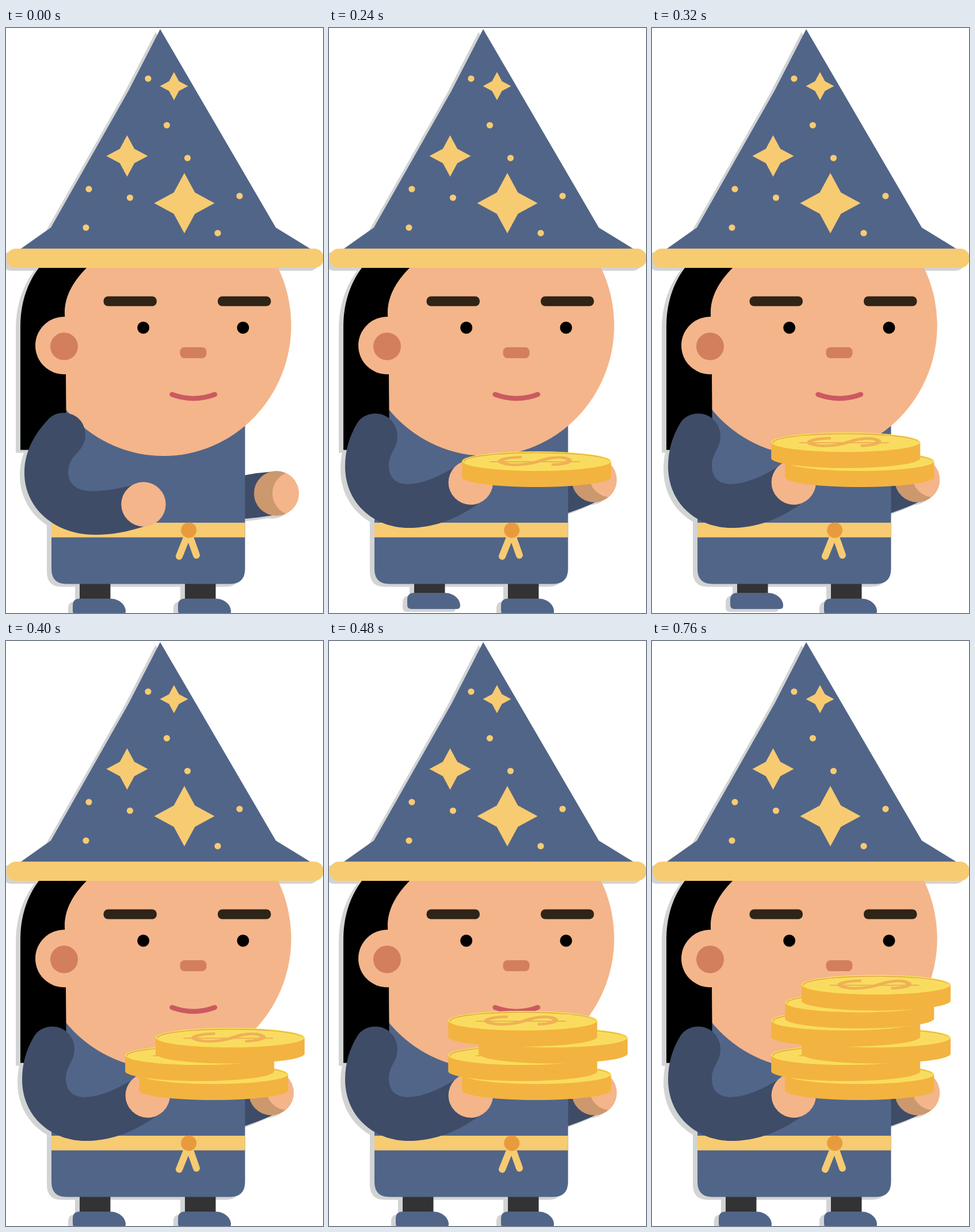
An HTML page for the animation above (0.8 s loop, 551 by 1017 pixels).

```html
<!DOCTYPE html>
<html lang="en">
<head>
<meta charset="utf-8">
<title>Wizard with coins</title>
<style>
  html, body { margin: 0; width: 100%; height: 100%; overflow: hidden; background: #fff; }
  svg { display: block; width: 100vw; height: 100vh; }
  .figure { filter: drop-shadow(-8px 5px 0 #d2d3d3); }
  .blue { fill: #516588; }
  .sleeve { fill: #3e4c67; }
  .gold { fill: #f7cb72; }
  .skin { fill: #f4b58a; }
  .blush { fill: #d37f5c; }
  .brow { fill: #2e2417; }
  .hide { display: none; }
</style>
</head>
<body>
<svg viewBox="0 0 551 1017">
  <defs>
    <g id="foot">
      <rect x="128" y="955" width="53.5" height="45" fill="#333"/>
      <path class="blue" d="M128 992H181C197 992 208 1003 208 1014Q208 1020 202 1020H123Q116 1020 116 1013V1004Q116 992 128 992Z"/>
    </g>
    <path id="star" d="M0-1 .35-.35 1 0 .35 .35 0 1-.35 .35-1 0-.35-.35Z"/>
    <clipPath id="palmLow"><circle cx="470" cy="809" r="39"/></clipPath>
    <clipPath id="palmHigh"><circle cx="461" cy="785.5" r="39"/></clipPath>
    <g id="coin">
      <path fill="#f3b340" d="M-129.5 0V28A129.5 17 0 0 0 129.5 28V0Z"/>
      <ellipse rx="129.5" ry="17" fill="#f9e24f"/>
      <ellipse rx="127" ry="15.3" fill="#e0a24c"/>
      <ellipse cx=".8" cy="1" rx="126.4" ry="14.9" fill="#f9dc5f"/>
      <g fill="none" stroke="#efb155">
        <path stroke-width="1.8" d="M-81 1H75"/>
        <path transform="scale(1 .45)" stroke-width="10" d="M-26-15C-52-16-74-1-56 9C-40 19-15 13 0 3C15-8 28-17 44-14C64-9 62 12 26 14"/>
      </g>
    </g>
  </defs>

  <g class="figure">
    <use id="left" href="#foot"/>
    <use id="right" href="#foot"/>

    <g class="low">
      <path class="sleeve" d="M400 780 415 777.5Q437 773 460 771.5L475 845Q440 852 400 854Z"/>
      <circle cx="470" cy="809" r="39" fill="#cc986e"/>
      <circle class="skin" cx="501.5" cy="809" r="38.5" clip-path="url(#palmLow)"/>
    </g>
    <g class="high">
      <path class="sleeve" d="M400 769 440 751 470 821Q440 836 400 848Z"/>
      <circle cx="461" cy="785.5" r="39" fill="#cc986e"/>
      <circle class="skin" cx="490" cy="778" r="38" clip-path="url(#palmHigh)"/>
    </g>

    <path class="blue" d="M79 640H415.500V940Q415.500 966.500 389 966.500H105Q79 966.500 79 940Z"/>
    <rect class="gold" x="79" y="860" width="336.5" height="25.5"/>
    <path d="M316 881 301 918.500M318.500 881 331 916.500" fill="none" stroke="#f7cb72" stroke-width="12" stroke-linecap="round"/>
    <circle cx="317.700" cy="873" r="13.500" fill="#e89b3d"/>

    <ellipse class="skin" cx="273.700" cy="517" rx="222" ry="227"/>
    <path d="M57 417C36 445 25 480 25 520V733.500H104.500V665L104 602 102 495C102 468 115 442 141 416V400H70Z"/>
    <circle class="skin" cx="101" cy="552" r="50"/>
    <circle class="blush" cx="101" cy="553.500" r="24"/>

    <rect class="brow" x="169.500" y="466.500" width="92.500" height="17" rx="8"/>
    <rect class="brow" x="368" y="466.500" width="92.500" height="17" rx="8"/>
    <circle cx="238.700" cy="521" r="10.500"/>
    <circle cx="412" cy="521" r="10.500"/>
    <rect class="blush" x="302.500" y="555" width="46" height="19" rx="7.500"/>
    <path d="M288.500 637Q326 651 363 637" fill="none" stroke="#cb5a60" stroke-width="8.500" stroke-linecap="round"/>

    <path class="blue" d="M268 2 469 347 530 384.500H25L78 347 213 109Z"/>
    <rect class="gold" x="1" y="383.500" width="551" height="33.500" rx="16"/>
    <g id="sparkles" class="gold"></g>

    <g class="low">
      <path class="sleeve" d="M72 682C85 665 115 664 130 683C142 700 140 720 127 735C112 750 108 760 108 773C109 798 130 806 155 805C180 804 200 800 218 795L242 866C210 876 185 881 155 881C85 881 32 835 32 773C32 738 48 708 72 682Z"/>
      <circle class="skin" cx="239" cy="828" r="38.700"/>
    </g>
    <g class="high">
      <path class="sleeve" d="M49 687C60 669 88 664 106 680C120 693 122 712 115 728C107 743 104 750 104 760C104 783 117 793 138 793C165 792 192 779 217 764L258 828C220 855 180 869 138 869C80 869 28 828 28 762C28 735 35 710 49 687Z"/>
      <circle class="skin" cx="246.300" cy="790" r="38.700"/>
    </g>
  </g>
  <g id="stack"></g>
</svg>

<script>
const LOOP = 800;
const $ = id => document.getElementById(id);

function add(parent, tag, attrs) {
  const el = document.createElementNS('http://www.w3.org/2000/svg', tag);
  for (const key in attrs) el.setAttribute(key, attrs[key]);
  return parent.appendChild(el);
}

const dots = [[247, 88], [279.5, 169], [315.5, 226], [144, 280],
              [215.5, 295], [406, 292], [139, 347], [368, 356.5]];
const stars = [[292, 101, 24.5], [210.5, 222.5, 36], [310, 304.5, 52.5]];
for (const [cx, cy] of dots) add($('sparkles'), 'circle', { cx, cy, r: 5.6 });
for (const [x, y, size] of stars)
  add($('sparkles'), 'use', { href: '#star', transform: `translate(${x} ${y}) scale(${size})` });

// x, y, time of arrival; bottom coin first
const coins = [[360.8, 753, 240], [336.7, 720, 320], [389.5, 689.5, 400],
               [336.7, 660, 480], [360.8, 628.5, 560], [389.5, 597.5, 560]]
  .map(([x, y, at]) => ({
    at, el: add($('stack'), 'use', { href: '#coin', transform: `translate(${x} ${y})` })
  }));

const show = (el, on) => el.classList.toggle('hide', !on);
const low = document.querySelectorAll('.low');
const high = document.querySelectorAll('.high');

function step(foot, x, lifted) {
  foot.setAttribute('transform', `translate(${x + (lifted ? 20 : 0)} ${lifted ? -10 : 0})`);
}

function draw(now) {
  const t = now % LOOP;
  const raised = t >= 160;
  low.forEach(el => show(el, !raised));
  high.forEach(el => show(el, raised));
  step($('left'), 0, t >= 160 && t < 360);
  step($('right'), 183, t >= 560 && t < 760);
  for (const { el, at } of coins) show(el, t >= at);
}

let start;
function tick(now) {
  start ??= now;
  draw(now - start);
  requestAnimationFrame(tick);
}
draw(0);
requestAnimationFrame(tick);
</script>
</body>
</html>
```
